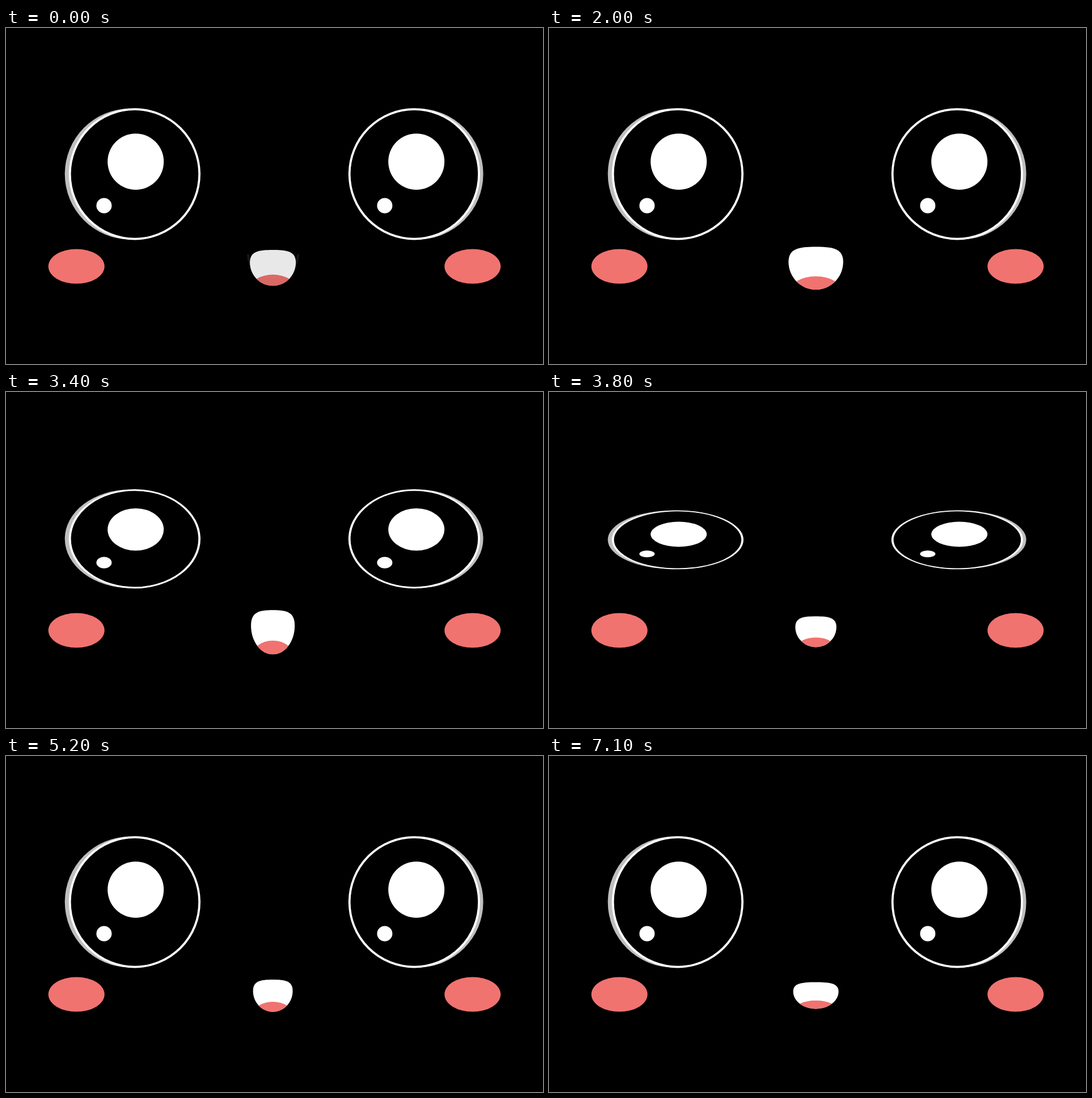
Animation, 947 px wide and 592 px high, one loop 7200 ms. Source, as an HTML page:

```html
<!DOCTYPE html>
<html lang="en">
<head>
<meta charset="utf-8">
<title>Talking face</title>
<style>
  html, body { margin: 0; width: 100%; height: 100%; overflow: hidden; background: #000; }
  svg { display: block; width: 100%; height: 100%; }
</style>
</head>
<body>
<svg viewBox="0 0 947 592">
  <defs>
    <clipPath id="lips">
      <path id="lipShape" d="M-48.2-8C-48.2-31.5-30-34.6 0-34.6S48.2-31.5 48.2-8C48.2 19 26.6 41 0 41S-48.2 19-48.2-8Z"/>
    </clipPath>
    <g id="shine" fill="#fff">
      <circle cx="228.7" cy="235.5" r="49.5"/>
      <circle cx="172.9" cy="313" r="13.5"/>
    </g>
    <ellipse id="cheek" cx="124.2" cy="420" rx="49.5" ry="30.6" fill="#f07370"/>
  </defs>
  <g id="eyes">
    <g fill="#bfbfbf">
      <circle cx="218.9" cy="257.3" r="115.2"/>
      <circle cx="726.4" cy="257.3" r="115.2"/>
    </g>
    <g stroke="#fff" stroke-width="3.8">
      <circle cx="226.9" cy="257.4" r="114.2"/>
      <circle cx="719.9" cy="257.4" r="114.2"/>
    </g>
    <use href="#shine"/>
    <use href="#shine" x="495"/>
  </g>
  <use href="#cheek"/>
  <use href="#cheek" x="698.6"/>
  <path id="smile" d="M427 400C431 452 511 452 515 400" fill="none" stroke="#fff" stroke-width="4" stroke-linecap="round"/>
  <g id="mouth">
    <use href="#lipShape" fill="#fff"/>
    <ellipse cy="47" rx="48" ry="29.6" fill="#f07370" clip-path="url(#lips)"/>
  </g>
</svg>
<script>
const LOOP = 7200, STEP = 100;
const BEAT = 300, LEAD = 200;
const BLINK_EVERY = 3000, BLINK_LENGTH = 800, BLINK_DELAY = 250;

// Horizontal and vertical scale of each mouth shape
const shapes = {
  rest: [0.84, 0.835],
  mid: [0.79, 0.79],
  small: [0.725, 0.75],
  wide: [1, 1],
  tall: [0.8, 1.033],
  flat: [0.83, 0.62]
};

// One shape per beat, named by its first letter
const speech = 'rrfmwtswwtmttsfmrwswtttsff';
const shapeList = Object.entries(shapes);
const score = [...speech].map(letter => shapeList.find(([name]) => name[0] === letter)[1]);

const byId = id => document.getElementById(id);
const eyes = byId('eyes'), mouth = byId('mouth'), smile = byId('smile');
const ease = p => (1 - Math.cos(Math.PI * p)) / 2;

function mouthScale(t) {
  const position = (t + LEAD) / BEAT, beat = Math.floor(position);
  const from = score[beat], to = score[beat + 1] ?? from;
  return from.map((value, axis) => value + (to[axis] - value) * ease(position - beat));
}

function eyeOpening(t) {
  const phase = (t - BLINK_DELAY) % BLINK_EVERY / BLINK_LENGTH;
  return t > BLINK_EVERY && phase < 1 ? 1 - 0.8 * ease(2 * phase) : 1;
}

function draw(now) {
  const t = Math.floor(now % LOOP / STEP) * STEP;
  const fade = t < STEP ? 0.09 : 0;
  eyes.setAttribute('transform', `translate(0 262.8) scale(1 ${eyeOpening(t)}) translate(0 -262.8)`);
  mouth.setAttribute('transform', `translate(470.6 420) scale(${mouthScale(t)})`);
  mouth.setAttribute('opacity', 1 - fade);
  smile.setAttribute('opacity', fade);
}

let origin;
function tick(now) {
  origin ??= now;
  draw(now - origin);
  requestAnimationFrame(tick);
}
draw(0);
requestAnimationFrame(tick);
</script>
</body>
</html>
```
